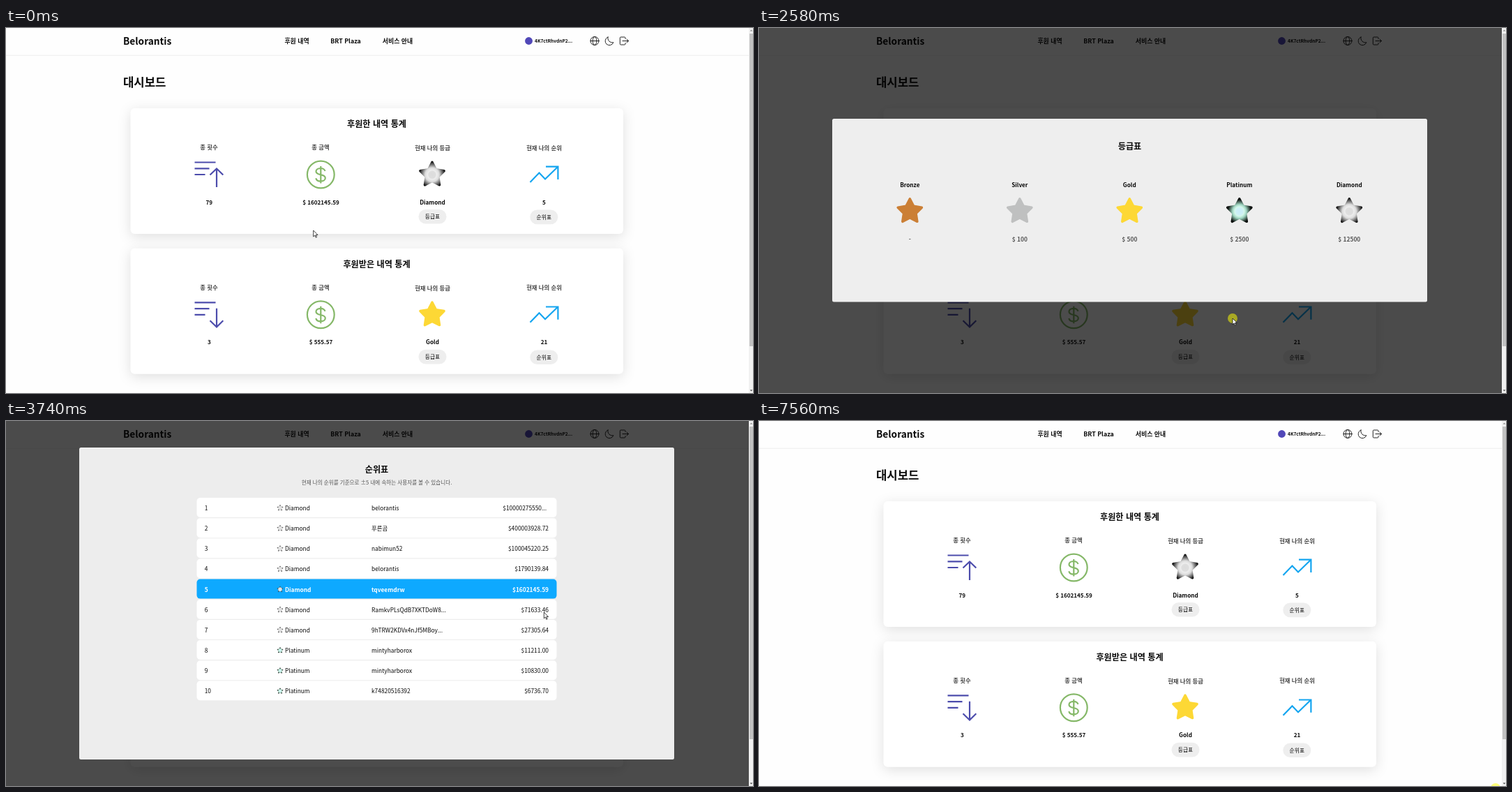
Animation, 1071 px wide and 523 px high, one loop 7.63 s. Source, as an HTML page:

```html
<!DOCTYPE html>
<html lang="ko">
<head>
<meta charset="utf-8">
<style>
  html, body { margin: 0; width: 100%; height: 100%; overflow: hidden; background: #fefefe; }
  svg { display: block; font-family: "Noto Sans CJK KR", "Noto Sans CJK JP", "Noto Sans CJK", sans-serif; }
  .card { fill: #fff; filter: drop-shadow(0 4px 9px rgba(0, 0, 0, .12)); }
  .line { fill: none; stroke-width: 2.2; }
  .thin { fill: none; stroke: #222; stroke-width: 1; stroke-linecap: round; stroke-linejoin: round; }
  .cursor { fill: #fff; stroke: #111; stroke-width: .8; stroke-linejoin: round; }
</style>
</head>
<body>
<svg id="stage" width="1071" height="523" viewBox="0 0 1071 523"></svg>
<script>
const LOOP = 7630, FRAME = 200 / 3;
const stage = document.getElementById('stage');

const text = (x, y, str, size, { weight = 700, anchor = 'middle', fill = '#0a0a0a' } = {}) =>
  `<text x="${x}" y="${y}" font-size="${size}" font-weight="${weight}" text-anchor="${anchor}" fill="${fill}">${str}</text>`;
const rect = (x, y, w, h, r, fill, extra = '') =>
  `<rect x="${x}" y="${y}" width="${w}" height="${h}" rx="${r}" fill="${fill}" ${extra}/>`;
const line = (d, color) => `<path class="line" stroke="${color}" d="${d}"/>`;

const tierPaint = {
  Bronze: '#cb7f35', Silver: '#bfc0c0', Gold: '#fdd835',
  Platinum: 'url(#platinum)', Diamond: 'url(#diamond)'
};
const starPoints = Array.from({ length: 10 }, (_, i) => {
  const r = i % 2 ? 9.3 : 18, a = i * Math.PI / 5;
  return [r * Math.sin(a), -r * Math.cos(a)].map(v => v.toFixed(2));
}).join(' ');
const star = (x, y, tier, scale = 1) =>
  `<polygon points="${starPoints}" transform="translate(${x} ${y}) scale(${scale})" fill="${tierPaint[tier]}"
    stroke="${tierPaint[tier]}" stroke-width="3.4" stroke-linejoin="round"/>`;

const gradient = (id, stops) =>
  `<radialGradient id="${id}" gradientUnits="userSpaceOnUse" cx="0" cy="0" r="20">${
    stops.map(([at, color]) => `<stop offset="${at}" stop-color="${color}"/>`).join('')}</radialGradient>`;

function header() {
  return rect(0, 38.8, 1065, .8, 0, '#eaeaea') +
    text(168, 24, 'Belorantis', 13.7, { anchor: 'start' }) +
    text(417, 22.3, '후원 내역', 8.9) +
    text(487, 22.3, 'BRT Plaza', 8.9) +
    text(561.5, 22.3, '서비스 안내', 8.9) +
    '<circle cx="749.5" cy="18.5" r="5.4" fill="#5148b8"/>' +
    text(758, 21.2, '4K7ctRhvdnP2...', 6.6, { anchor: 'start' }) +
    `<g class="thin"><circle cx="844" cy="18.5" r="6"/><ellipse cx="844" cy="18.5" rx="2.8" ry="6"/>
      <path d="M838 18.5H850M863 13A6 6 0 1 0 870.8 20.6A6.3 6.3 0 0 1 863 13Z"/>
      <path d="M888 15.5V14.2Q888 13 886.8 13H881.5Q880.3 13 880.3 14.2V22.8Q880.3 24 881.5 24H886.8Q888 24 888 22.8V21.5M884 18.5H892.5M890 16L892.5 18.5L890 21"/></g>` +
    text(168, 84.2, '대시보드', 16.7, { anchor: 'start' });
}

function card(top, title, count, amount, tier, rank, arrow) {
  const label = { fill: '#444' };
  const button = (x, y, str) =>
    rect(x - 20, y, 40, 20.6, 10.3, '#eee', 'class="button"') + text(x, y + 13.3, str, 7.8, { weight: 500 });
  return `<g transform="translate(0 ${top})">` +
    rect(178.5, 115, 706.5, 180, 6, '#fff', 'class="card"') +
    text(531.5, 142, title, 12.15) +
    text(291, 174.4, '총 횟수', 8.35, label) + text(451, 174.4, '총 금액', 8.35, label) +
    text(611.5, 175, '현재 나의 등급', 8.35, label) + text(771.5, 174.6, '현재 나의 순위', 8.35, label) +
    line('M270.5 192.5H300.5M270.5 201.3H291.5M270.5 210H285.5M302 201V228' + arrow, '#4c4cac') +
    '<circle class="line" cx="451.3" cy="210" r="19.4" stroke="#85b868"/>' +
    line('M457.5 205C456.5 202 454 201 451 201C447 201 444.5 203 444.5 205.6S447 209.4 451 210.2S457.8 212.2 457.8 215S455 219.6 451 219.6C447.5 219.6 445 218.1 444.3 215.2M451.3 198V222.5', '#85b868') +
    star(611, 210.3, tier) +
    line('M751.5 221L764.5 207.5L773 216.5L791 199M774 198.7H791.4V217', '#14a5f0') +
    text(291.3, 252.6, count, 8.1) + text(451.5, 252.6, amount, 8.1) +
    text(611.5, 252.6, tier, 8.2) + text(771.5, 252.6, rank, 8.1) +
    button(611.5, 260, '등급표') + button(771.3, 260.6, '순위표') + '</g>';
}

function gradeModal() {
  const tiers = [['Bronze', '-'], ['Silver', '$ 100'], ['Gold', '$ 500'], ['Platinum', '$ 2500'], ['Diamond', '$ 12500']];
  return rect(105, 130, 853, 262.5, 2.5, '#eee') + text(531.5, 174, '등급표', 12.15) +
    tiers.map(([name, price], i) => {
      const x = 216.3 + i * 157.5;
      return text(x, 227.7, name, 8.2) + star(x, 262.8, name) + text(x, 305.7, price, 8.4, { fill: '#555' });
    }).join('');
}

function rankModal() {
  const users = [
    ['belorantis', '$10000275550...'], ['푸른곰', '$400003928.72'], ['nabimun52', '$100045220.25'],
    ['belorantis', '$1790139.84'], ['tqveemdrw', '$1602145.59'], ['RamkvPLsQdB7XKTDoW8...', '$71633.46'],
    ['9hTRW2KDVx4nJf5MBoy...', '$27305.64'], ['mintyharborox', '$11211.00'],
    ['mintyharborox', '$10830.00'], ['k74820516392', '$6736.70']
  ];
  return rect(105, 38, 853, 447, 2.5, '#ededed') + text(531.5, 73.6, '순위표', 12.15) +
    text(531.5, 91.4, '현재 나의 순위를 기준으로 ±5 내에 속하는 사용자를 볼 수 있습니다.', 7.55, { weight: 400, fill: '#555' }) +
    users.map(([name, amount], i) => {
      const y = 110 + i * 29.15, mine = i === 4, tier = i < 7 ? 'Diamond' : 'Platinum';
      const style = { weight: mine ? 700 : 400, fill: mine ? '#fff' : '#0a0a0a', anchor: 'start' };
      const cell = (x, str, anchor = 'start') => text(x, y + 17.9, str, 8.37, { ...style, anchor });
      return rect(273.5, y, 516, 28, 5, mine ? '#0ea9ff' : '#fff') +
        cell(284.7, i + 1) + star(393, y + 14.6, tier, .23) + cell(400, tier) +
        cell(524, name) + cell(i ? 778 : 775, amount, 'end');
    }).join('');
}

const scrollbar = rect(1065, 0, 6, 523, 0, '#f1f1f1') + rect(1066, 8, 5, 448, 0, '#c1c1c1') +
  '<path d="M1066.6 4.6L1068.5 2.4L1070.4 4.6Z" fill="#888"/><path d="M1066.6 518.4L1068.5 520.6L1070.4 518.4Z" fill="#444"/>';

stage.innerHTML =
  '<defs>' +
  gradient('diamond', [[0, '#dcdcdc'], [.25, '#dedede'], [.32, '#eee'], [.5, '#ddd'], [.95, '#080808']]) +
  gradient('platinum', [[0, '#c8ecf8'], [.25, '#cdf0f6'], [.34, '#d4f7ea'], [.5, '#a0d6c2'], [.85, '#080c0a']]) +
  '</defs>' + header() +
  card(0, '후원한 내역 통계', '79', '$ 1602145.59', 'Diamond', '5', 'M292.5 210.5L302 201.5L311.3 210.5') +
  card(200.8, '후원받은 내역 통계', '3', '$ 555.57', 'Gold', '21', 'M292.5 218.5L302 227.7L311.3 218.5') +
  `<rect id="shade" width="1065" height="523" fill="#000" opacity=".7"/>
   <g id="grades">${gradeModal()}</g><g id="ranks">${rankModal()}</g>${scrollbar}
   <g id="pointer"><circle id="press" r="7" fill="#ff0" opacity=".52"/>
     <path id="arrow" class="cursor" d="M0 0V8.9L2.1 7L3.5 10.2L4.9 9.6L3.5 6.5H6.3Z"/>
     <path id="hand" class="cursor" d="M-1.1 7.2V1Q-1 0 0 0T1.1 1V4.5Q3 3.8 3.3 5Q5 4.4 5.3 5.6Q7 5.2 7 7V9.5Q6.5 12.8 3.5 12.8H1.5Q-.5 12.5 -1.5 10.5L-3.3 7.6Q-3.2 6 -1.1 7.2Z"/></g>`;

// Pointer path as [ms, x, y], linear between points
const path = [
  [0, 440.7, 290], [133, 440.7, 290], [900, 568, 279], [1170, 608.5, 272.3], [2033, 608.5, 272.3],
  [2500, 679, 416], [2600, 679, 416], [2860, 725, 336], [3260, 771.3, 274], [4467, 771.3, 274],
  [4720, 1005, 253], [6203, 1005, 253], [6400, 990, 246.5], [6600, 968.5, 278], [6850, 1000, 340],
  [7020, 1041, 375], [7330, 1063, 460], [7530, 1056, 526], [LOOP, 1056, 526]
];
const presses = [[1510, 1570], [2580, 2650], [3670, 3740], [5410, 6000], [7560, LOOP]];
const within = (t, [from, to]) => t >= from && t < to;

function pointerAt(t) {
  const i = path.findIndex(p => p[0] > t);
  const [t0, x0, y0] = path[i - 1], [t1, x1, y1] = path[i];
  const k = (t - t0) / (t1 - t0);
  return [x0 + (x1 - x0) * k, y0 + (y1 - y0) * k];
}

const el = id => document.getElementById(id);
const show = (id, on) => el(id).setAttribute('visibility', on ? 'visible' : 'hidden');
const buttons = [...document.querySelectorAll('.button')].slice(0, 2);

function render(now) {
  const t = now % LOOP;
  const [x, y] = pointerAt(Math.floor((t + 5) / FRAME) * FRAME % LOOP);
  const grades = within(t, [1570, 2650]), ranks = within(t, [3740, 6000]), open = grades || ranks;
  let hovering = false;
  for (const b of buttons) {
    const left = b.x.baseVal.value, top = b.y.baseVal.value;
    const hover = !open && x > left && x < left + 40 && y > top && y < top + 20.6;
    b.setAttribute('fill', hover ? '#0ea9ff' : '#eee');
    hovering ||= hover;
  }
  show('shade', open);
  show('grades', grades);
  show('ranks', ranks);
  show('press', presses.some(p => within(t, p)));
  show('hand', hovering);
  show('arrow', !hovering);
  el('pointer').setAttribute('transform', `translate(${x} ${y})`);
}

const start = performance.now();
function tick() {
  render(performance.now() - start);
  requestAnimationFrame(tick);
}
tick();
</script>
</body>
</html>
```
